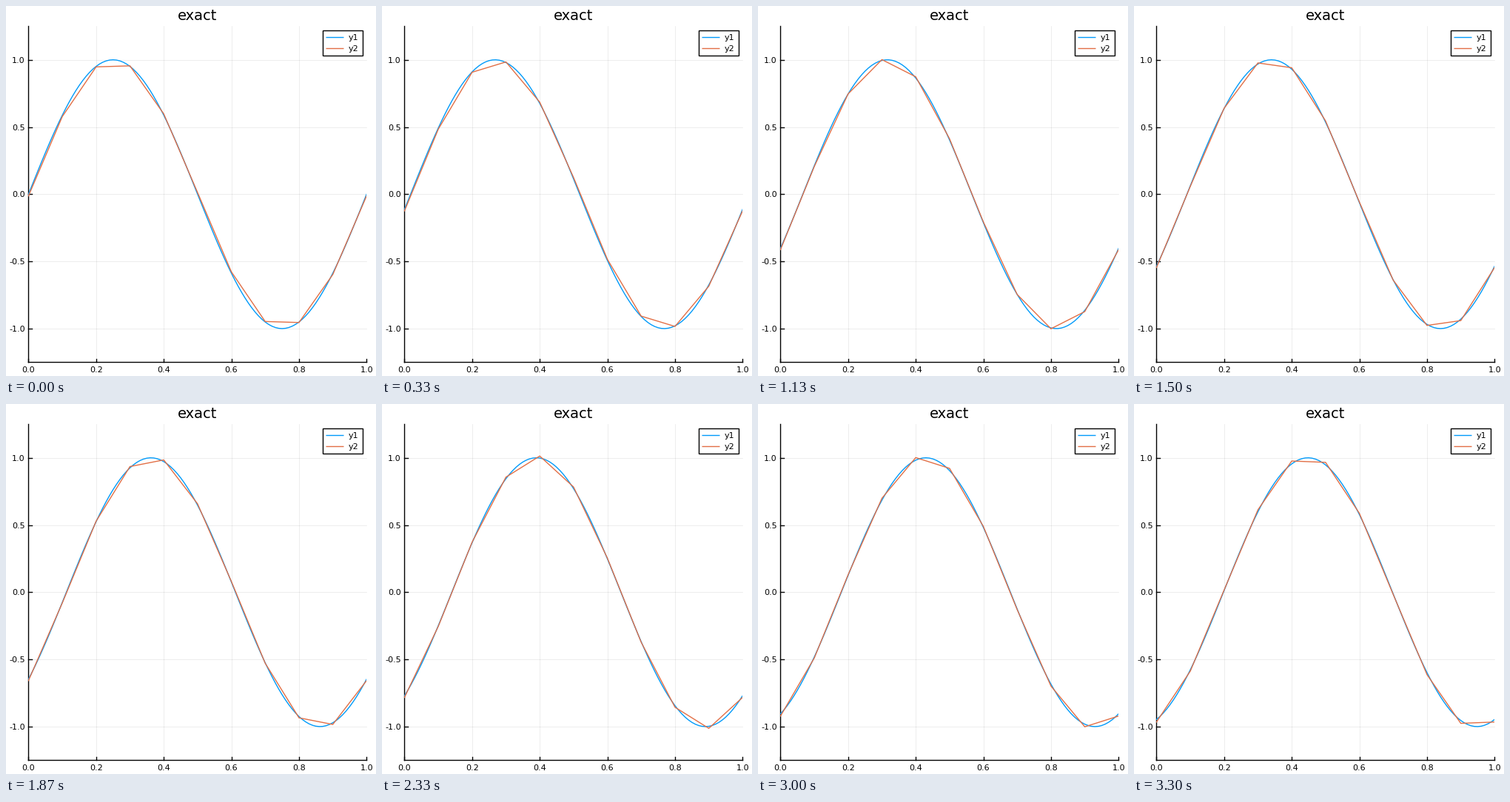
A matplotlib script that plays this animation: 500 px wide and 500 px high, repeating every 3.33 s.

```python
import numpy as np
import matplotlib.pyplot as plt
from matplotlib.animation import FuncAnimation
from matplotlib.patches import Rectangle

plt.rcParams["font.family"] = "DejaVu Sans"

SIZE, DPI = 500, 100
FRAMES, LOOP_MS = 100, 3330
LEFT, RIGHT, TOP, BOTTOM = 30.4, 487.3, 27.3, 481.3
Y_MAX = 1.25
BLUE, ORANGE = "#009AFA", "#E26F46"

DT = 0.002                       # travel of the exact wave per frame
PHASE_STEP = np.radians(0.711)   # numerical wave: phase per step
GROWTH = 2.1e-4                  # numerical wave: amplitude growth per step


def px(x):
    return LEFT + (RIGHT - LEFT) * x


def py(y):
    return (TOP + BOTTOM) / 2 - (BOTTOM - TOP) / (2 * Y_MAX) * y


fig = plt.figure(figsize=(SIZE / DPI, SIZE / DPI), dpi=DPI, facecolor="white")
ax = fig.add_axes([0, 0, 1, 1])
ax.set_xlim(0, SIZE)
ax.set_ylim(SIZE, 0)
ax.axis("off")


def line(xs, ys, color="black", lw=1.0, **kw):
    return ax.plot(xs, ys, color=color, lw=lw, **kw)[0]


def label(x, y, s, size=8, ha="center"):
    ax.text(x, y, s, fontsize=size, ha=ha, va="baseline", zorder=6)


# Grid, ticks and tick labels
for x in np.linspace(0, 1, 6):
    if 0 < x < 1:
        line([px(x)] * 2, [TOP, BOTTOM], lw=0.5, alpha=0.1)
    line([px(x)] * 2, [BOTTOM, BOTTOM - 4.8])
    label(px(x), 495, f"{x:.1f}")

for y in np.linspace(-1, 1, 5):
    line([LEFT, RIGHT], [py(y)] * 2, lw=0.5, alpha=0.1)
    line([LEFT, LEFT + 4.8], [py(y)] * 2)
    label(25.6, py(y) + 4.1, f"{y:.1f}", ha="right")

line([LEFT] * 2, [TOP, BOTTOM])
line([LEFT, RIGHT], [BOTTOM] * 2)
label(258.9, 19, "exact", size=14)

# Curves, clipped to the plot area
area = Rectangle((LEFT, TOP), RIGHT - LEFT, BOTTOM - TOP,
                 transform=ax.transData)
x_fine = np.linspace(0, 1, 101)
x_grid = np.linspace(0, 1, 11)
exact = line(px(x_fine), py(0 * x_fine), BLUE, zorder=3)
approx = line(px(x_grid), py(0 * x_grid), ORANGE, zorder=4)
for curve in (exact, approx):
    curve.set_clip_path(area)
    curve.set_solid_joinstyle("miter")

# Legend
ax.add_patch(Rectangle((428.3, 33.3), 54, 34, fc="white", ec="black",
                       lw=1.0, zorder=5))
for name, color, y in (("y1", BLUE, 41.7), ("y2", ORANGE, 57.2)):
    line([432, 456], [y, y], color, zorder=6, solid_capstyle="butt")
    label(463, y + 4, name, ha="left")


def update(i):
    step = i + 1
    wave = np.sin(2 * np.pi * (x_fine - DT * i))
    nodes = np.exp(GROWTH * step) * np.sin(2 * np.pi * x_grid - PHASE_STEP * step)
    exact.set_ydata(py(wave))
    approx.set_ydata(py(nodes))
    return exact, approx


anim = FuncAnimation(fig, update, frames=FRAMES, interval=LOOP_MS / FRAMES,
                     repeat=True, repeat_delay=0)
plt.show()
```
